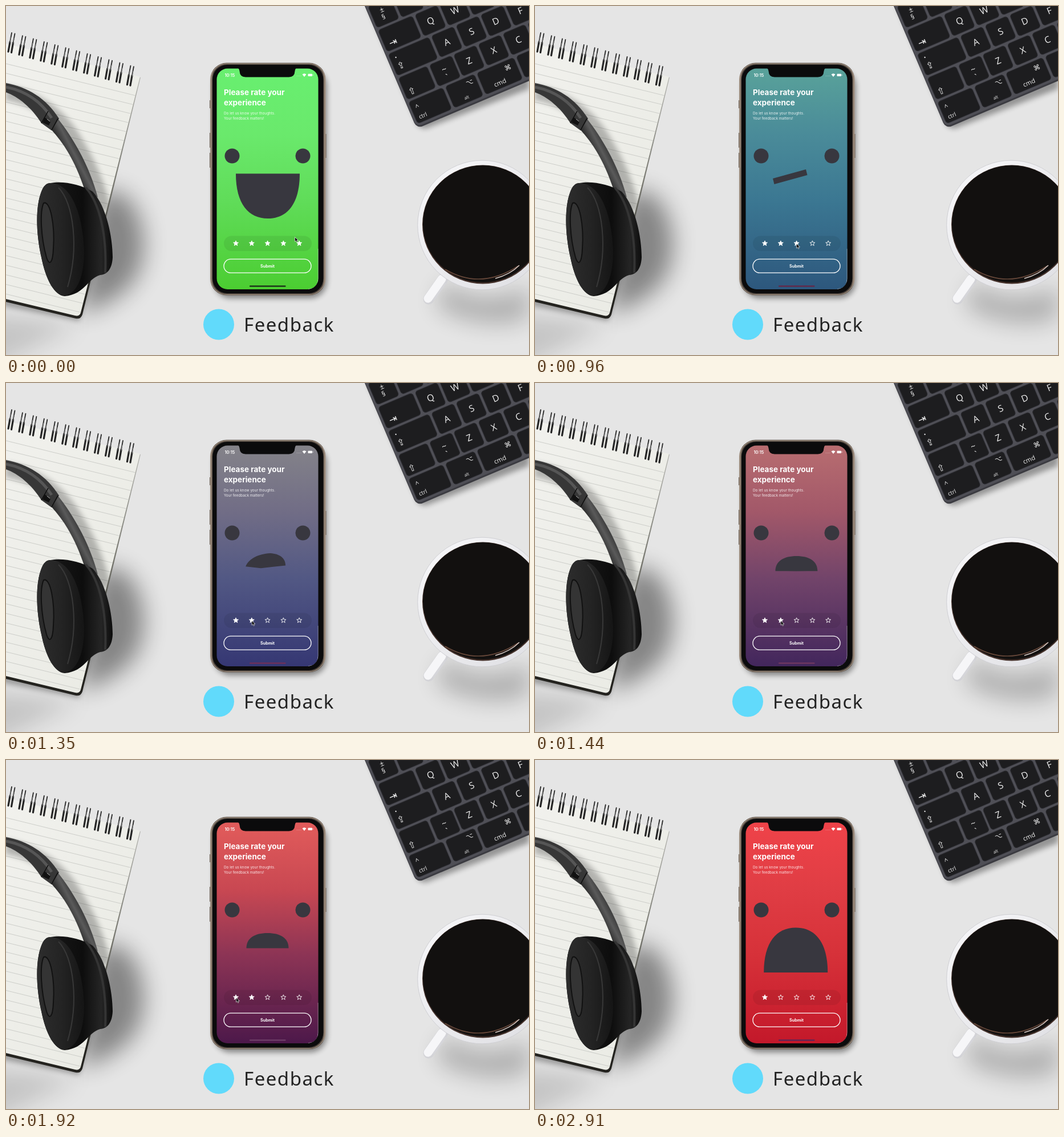
An HTML page that plays this animation: 917 by 611 pixels, repeating every 2.97 s.

```html
<!DOCTYPE html>
<html lang="en">
<head>
<meta charset="utf-8">
<title>Feedback</title>
<style>
  html, body { margin: 0; width: 100%; height: 100%; overflow: hidden; background: #e5e5e5; }
  svg { display: block; width: 917px; height: 611px; }
  #screen text { font-family: Inter, Roboto, sans-serif; fill: #fff; }
  #keys text { font-family: "Open Sans", "DejaVu Sans", sans-serif; fill: #f0f0f0; text-anchor: middle; }
</style>
</head>
<body>
<svg viewBox="0 0 917 611">
  <defs>
    <filter id="soft" x="-60%" y="-60%" width="220%" height="220%"><feGaussianBlur stdDeviation="20"/></filter>
    <filter id="near" x="-50%" y="-50%" width="200%" height="200%"><feGaussianBlur stdDeviation="5"/></filter>
    <linearGradient id="sky" x2="0" y2="1">
      <stop/><stop offset=".3"/><stop offset=".6"/><stop offset="1"/>
    </linearGradient>
    <linearGradient id="paper" x2="1" y2="1">
      <stop stop-color="#f1f1ed"/><stop offset="1" stop-color="#e9eae3"/>
    </linearGradient>
    <linearGradient id="cover" x2="0" y2="1">
      <stop stop-color="#c4c4c0"/><stop offset=".5" stop-color="#77776f"/><stop offset=".9" stop-color="#24231f"/>
    </linearGradient>
    <linearGradient id="arm" gradientUnits="userSpaceOnUse" x1="97" y1="254" x2="126" y2="239">
      <stop stop-color="#222"/><stop offset=".55" stop-color="#5a5a5a"/><stop offset="1" stop-color="#303030"/>
    </linearGradient>
    <linearGradient id="cup" x2="1">
      <stop stop-color="#1c1c1c"/><stop offset=".6" stop-color="#0d0d0d"/>
      <stop offset=".85" stop-color="#252525"/><stop offset="1" stop-color="#0c0c0c"/>
    </linearGradient>
    <linearGradient id="pad" x2="1">
      <stop stop-color="#2d2d2d"/><stop offset=".5" stop-color="#242424"/><stop offset="1" stop-color="#151515"/>
    </linearGradient>
    <linearGradient id="china" x2="1" y2="1">
      <stop stop-color="#f8f8fa"/><stop offset="1" stop-color="#dedee2"/>
    </linearGradient>
    <linearGradient id="metal" x2="1">
      <stop stop-color="#9a8a7a"/><stop offset=".03" stop-color="#4d443d"/>
      <stop offset=".97" stop-color="#4d443d"/><stop offset="1" stop-color="#a59382"/>
    </linearGradient>
    <clipPath id="glass"><rect x="369.5" y="109.5" width="178" height="386.5" rx="19"/></clipPath>
    <clipPath id="page"><path d="M0 66L235 124L131 537Q129 544 121 542L0 513Z"/></clipPath>
  </defs>

  <!-- notebook -->
  <path d="M160 330C215 300 250 380 240 440S180 520 130 540Z" opacity=".42" filter="url(#soft)"/>
  <path d="M-40 540L130 556L-40 640Z" opacity=".14" filter="url(#soft)"/>
  <path d="M-20 522L128 551L165 420L120 520L-20 500Z" opacity=".3" filter="url(#near)"/>
  <path d="M0 70L236 125L134 540Q131 549 122 547L0 518Z" fill="url(#cover)"/>
  <path d="M0 66L235 124L131 537Q129 544 121 542L0 513Z" fill="url(#paper)"/>
  <g id="lines" clip-path="url(#page)" stroke="#c9cac6" stroke-width=".9"></g>
  <g id="coils" stroke="#262626" stroke-linecap="round"></g>

  <!-- headphones -->
  <g clip-path="url(#page)">
    <path d="M0 152C50 160 92 190 118 232S160 310 172 360" fill="none" stroke="#000" stroke-width="26" opacity=".25" filter="url(#near)"/>
  </g>
  <path d="M90 196C122 236 148 286 161 335L138 322C124 280 106 245 79 216Z" fill="url(#arm)"/>
  <path d="M0 135C38 142 70 161 93 197L80 218L62 205C45 178 22 159 0 151Z" fill="#373737"/>
  <path d="M0 142C36 149 62 168 80 196" fill="none" stroke="#565656" stroke-width="5"/>
  <path d="M74 184L62 205M91 197L80 217" stroke="#0c0c0c" stroke-width="1.5"/>
  <path d="M68 195l10 8l-3 6l-11 -5z" fill="#111"/><path d="M72 198l5 4" stroke="#aaa"/>
  <path d="M78 310C100 306 130 312 152 325C176 350 187 405 187 440C186 460 178 470 165 471C142 478 138 505 103 508C85 507 70 480 62 440C52 395 52 350 62 325C66 315 70 311 78 310Z" fill="url(#cup)"/>
  <path d="M140 318C164 345 177 400 174 467" fill="none" stroke="#343434" stroke-width="4"/>
  <path d="M76 310C112 308 134 360 137 425C138 470 126 503 103 507C85 506 70 480 62 440C52 395 52 350 62 325C66 315 70 311 76 310Z" fill="url(#pad)"/>
  <path d="M66 345C78 340 86 385 83 425C82 450 76 456 71 440C61 405 59 360 66 345Z" fill="#343434" stroke="#111" stroke-width="2"/>
  <path d="M92 318C119 345 128 425 108 492" fill="none" stroke="#383838" stroke-width="2"/>

  <!-- keyboard -->
  <path d="M634 0L723 211L735 215L917 145V60Z" opacity=".35" filter="url(#near)"/>
  <g id="keys" transform="translate(773 63) rotate(-23)">
    <rect x="-108" y="-220" width="420" height="339" rx="11" fill="#3b3b41"/>
    <rect x="-107" y="-220" width="416" height="336" rx="10" fill="#4f4f56"/>
  </g>

  <!-- coffee -->
  <path d="M770 480C800 520 880 515 917 490V545C860 570 780 545 755 525Z" opacity=".24" filter="url(#soft)"/>
  <path d="M766 478L741 513" stroke="#d3d3d7" stroke-width="19" stroke-linecap="round"/>
  <path d="M764 478L740 512" stroke="#f6f6f8" stroke-width="15" stroke-linecap="round"/>
  <path d="M770 486L750 514" stroke="#d6d6da" stroke-width="3" stroke-linecap="round"/>
  <circle cx="835" cy="383.5" r="113.3" fill="url(#china)" stroke="#cfcfd3"/>
  <ellipse cx="836" cy="382.5" rx="106" ry="104" fill="#43302a"/>
  <ellipse cx="836" cy="381.5" rx="105" ry="102.5" fill="#12100f"/>
  <path d="M770 461Q832 498 898 455" fill="none" stroke="#67483a" stroke-width="1.5"/>
  <path d="M858 477Q884 470 900 454" fill="none" stroke="#d9cbc6" stroke-width="1.5"/>

  <!-- phone -->
  <rect x="364" y="110" width="199" height="402" rx="30" opacity=".4" filter="url(#near)"/>
  <path d="M358 165v14M358 222v26M358 257v26M560.500 224v42" stroke="#6e6258" stroke-width="2"/>
  <rect x="358" y="99.500" width="202.500" height="407" rx="29" fill="url(#metal)"/>
  <rect x="359.300" y="100.800" width="200" height="404.500" rx="28" fill="none" stroke="#a39282" stroke-width="1.200"/>
  <rect x="362" y="103" width="194.500" height="400" rx="26" fill="#0b0b0c"/>
  <g id="screen" clip-path="url(#glass)">
    <rect x="369" y="109" width="179" height="388" fill="url(#sky)"/>
    <path d="M547.2 425V478Q547 495 530 495.7" fill="none" stroke="#fff" opacity=".55"/>
    <text x="383.5" y="124" font-size="7.3" font-weight="600">10:15</text>
    <path d="M519.5 119.8Q523 116.8 526.5 119.8L523 124Z" fill="#fff"/>
    <rect x="529.5" y="118.7" width="7.5" height="4.2" rx="1" fill="#fff"/>
    <path d="M538.3 120v1.6" stroke="#fff" stroke-width=".8"/>
    <path d="M509.5 122.5h8" stroke="#fff" stroke-dasharray="1 1.3" opacity=".4"/>
    <g font-size="13.5" font-weight="700">
      <text x="382" y="156.3">Please rate your</text><text x="382" y="173.5">experience</text>
    </g>
    <g font-size="6.4" opacity=".85">
      <text x="382" y="190.3">Do let us know your thoughts.</text><text x="382" y="198.5">Your feedback matters!</text>
    </g>
    <g fill="#38373f">
      <circle cx="396.5" cy="262.5" r="13"/><circle cx="520.5" cy="262.5" r="13"/>
      <path id="mouth"/>
    </g>
    <rect x="382" y="402.5" width="154" height="26.5" rx="13.2" opacity=".07"/>
    <g id="stars" stroke="#fff" stroke-width=".9" stroke-linejoin="round"></g>
    <rect x="382" y="443.2" width="153" height="24" rx="12" fill="none" stroke="#fff" stroke-width="1.3"/>
    <text x="458.5" y="457.8" font-size="7.2" font-weight="700" text-anchor="middle">Submit</text>
    <path id="bar" d="M428 490.5H489.5" stroke-width="2.2" stroke-linecap="round"/>
    <path id="cursor" d="M0 0V8L1.9 6.4L3.2 9.2L4.6 8.5L3.4 5.8H6Z" fill="#111" stroke="#fff" stroke-width=".6"/>
  </g>
  <path d="M405 108H511Q507 109 506.5 114Q506 124.5 496 124.5H420Q410 124.5 409.5 114Q409 109 405 108Z" fill="#0b0b0c"/>

  <circle cx="373" cy="557.5" r="27" fill="#61dafb"/>
  <text x="417" y="570" font-family="'Noto Sans', 'Open Sans', sans-serif" font-size="33" letter-spacing="1.5" fill="#222">Feedback</text>
</svg>
<script>
const LOOP = 2970, STEP = 30;
const $ = id => document.getElementById(id);
const add = (parent, tag, attrs, text) => {
  const el = document.createElementNS('http://www.w3.org/2000/svg', tag);
  for (const k in attrs) el.setAttribute(k, attrs[k]);
  if (text) el.textContent = text;
  return $(parent).appendChild(el);
};
const mix = (a, b, k) => a.map((v, i) => v + (b[i] - v) * k);
const clamp = v => Math.max(0, Math.min(1, v));
const easeOut = (k, power) => 1 - (1 - clamp(k)) ** power;

// Notebook
for (let i = 0; i < 26; i++) {
  const y = 101 + i * 16.8;
  add('lines', 'path', { d: `M0 ${y}L240 ${y + 59}` });
}
for (let i = 0; i < 12; i++) {
  const x = 8 + i * 18.95, y = 66 + i * 5.25;
  for (const dx of [0, 5.5]) {
    const left = x + dx, top = y - 19 + dx / 4;
    add('coils', 'path', { d: `M${left + 2} ${top}l-3 16`, 'stroke-width': 1.8 });
    add('coils', 'path', { d: `M${left - 1} ${top + 16}l-3 17`, 'stroke-width': 3.2 });
    add('coils', 'path', { d: `M${left + .8} ${top + 8}l-1.6 9`, stroke: '#999', 'stroke-width': .7 });
  }
}

// Keyboard: each row is y, then pairs of left and right key edges
const rows = [
  [-91, -103, -61, -56, -14, -9, 33, 38, 80],
  [-45.5, -103, -38, -33, 9, 14, 56, 61, 103, 108, 150],
  [0, -103, -26, -21, 21, 26, 68, 73, 115, 120, 162],
  [45.5, -103, -49, -44, -2, 2, 44, 49, 91, 96, 138, 143, 185],
  [91, -103, -38, -33, 22, 27, 97, 102, 300]
];
for (const [y, ...edges] of rows)
  for (let i = 0; i < edges.length; i += 2)
    add('keys', 'rect', { x: edges[i], y: y - 20.5, width: edges[i + 1] - edges[i], height: 41, rx: 5, fill: '#1d1d1f', stroke: '#2b2b30' });
const legends = [
  ['Q', -12, -45.5, 16], ['W', 35, -45.5, 16], ['A', 0, 0, 16], ['S', 47, 0, 16], ['D', 93, 0, 16], ['F', 140, 0, 16],
  ['Z', 23, 45.5, 16], ['X', 70, 45.5, 16], ['C', 117, 45.5, 16], ['~', -23, 42, 15], ['`', -23, 57, 15],
  ['±', -83, -97, 13], ['§', -85, -84, 12], ['⇥', -87, -37, 17], ['•', -93, -10, 10], ['⇪', -90, 6, 16],
  ['⇧', -90, 55, 16], ['^', -92, 84, 12], ['ctrl', -89, 102, 10], ['⌥', 9, 80, 11], ['alt', -6, 103, 7.5],
  ['⌘', 81, 83, 12], ['cmd', 58, 102, 11]
];
for (const [s, x, y, size] of legends) add('keys', 'text', { x, y: y + size * .35, 'font-size': size }, s);

// Mouths: a closed loop of four cubic curves, twelve points each
const line = (a, b) => [a, mix(a, b, 1 / 3), mix(a, b, 2 / 3)];
const quad = (a, b, c, d) => [...line(a, b), ...line(b, c), ...line(c, d), ...line(d, a)].flat();
function bowl(x, y, w, h) {
  const l = [x - w, y], m = [x, y], r = [x + w, y];
  return [...line(l, m), ...line(m, r), r, [x + w, y + h * .68], [x + w * .6, y + h],
    [x, y + h], [x - w * .6, y + h], [x - w, y + h * .68]].flat();
}
function dome(x, y, w, h) {
  const l = [x - w, y], m = [x, y], r = [x + w, y];
  return [l, [x - w, y - h * .68], [x - w * .6, y - h], [x, y - h], [x + w * .6, y - h], [x + w, y - h * .68],
    ...line(r, m), ...line(m, l)].flat();
}
const toPath = p => `M${p[0]} ${p[1]}` + [2, 8, 14, 20].map(i => 'C' + [...p, p[0], p[1]].slice(i, i + 6)).join('') + 'Z';

const rgb = list => list.split(' ').flatMap(c => [0, 2, 4].map(i => parseInt(c.slice(i, i + 2), 16)));
// Colours: four gradient stops, then the home bar
const moods = [
  { stars: 5, mouth: bowl(459, 293.5, 56, 78.5), colors: rgb('68ef70 6ae96c 60dc59 4bcd31 151515') },
  { stars: 4, mouth: bowl(459, 300, 47, 55), colors: rgb('70f474 66dd69 59cb54 42c43a 151515') },
  { stars: 3, mouth: quad([417, 302], [475, 286], [477.5, 296], [419.5, 312]), colors: rgb('5596a0 467fa0 366a9b 2a4687 7a2348') },
  { stars: 2, mouth: dome(458.5, 329.5, 37, 26.5), colors: rgb('e25c5b c94852 8c3455 4c184a 74456c') },
  { stars: 1, mouth: dome(457.2, 372, 56, 78.5), colors: rgb('ef4349 e03d44 d63139 c3182a 4a2a60') }
];
// Start and length of the change into each later mood
const changes = [[210, 330], [750, 330], [1290, 330], [1920, 180]];
// Pointer stops: time, x, y
const stops = [[0, 506.5, 404.5], [30, 506.5, 404.5], [90, 485.5, 415.5], [570, 485.5, 415.5], [630, 458.5, 416],
  [1110, 458.5, 416], [1170, 431, 416], [1590, 431, 416], [1650, 403.5, 416], [2610, 403.5, 416], [2670, 376, 399]];

const starShape = x => 'M' + Array.from({ length: 10 }, (_, i) => {
  const r = i % 2 ? 2 : 4.7, a = i * Math.PI / 5;
  return [x + r * Math.sin(a), 415.6 - r * Math.cos(a)];
}).join('L') + 'Z';
const stars = [403, 430.8, 458.6, 486.4, 514.2].map(x => add('stars', 'path', { d: starShape(x) }));
const skyStops = document.querySelectorAll('#sky stop');

function draw(t) {
  let { mouth, colors, stars: count } = moods[0];
  changes.forEach(([start, length], i) => {
    if (t <= start) return;
    const next = moods[i + 1];
    mouth = mix(mouth, next.mouth, easeOut((t - start) / 180, 3));
    colors = mix(colors, next.colors, easeOut((t - start) / length, 2));
    count = next.stars;
  });
  const color = i => `rgb(${colors.slice(i * 3, i * 3 + 3).map(Math.round)})`;
  skyStops.forEach((s, i) => s.setAttribute('stop-color', color(i)));
  $('bar').setAttribute('stroke', color(4));
  $('mouth').setAttribute('d', toPath(mouth));
  stars.forEach((s, i) => s.setAttribute('fill', i < count ? '#fff' : 'none'));

  const n = stops.findIndex(s => s[0] > t);
  $('cursor').style.display = n < 0 ? 'none' : '';
  if (n > 0) {
    const a = stops[n - 1], b = stops[n];
    const [, x, y] = mix(a, b, (t - a[0]) / (b[0] - a[0]));
    $('cursor').setAttribute('transform', `translate(${x} ${y})`);
  }
}

const begin = performance.now();
function tick(now) {
  const t = Math.max(0, now - begin) % LOOP;
  draw(t - t % STEP);
  requestAnimationFrame(tick);
}
draw(0);
requestAnimationFrame(tick);
</script>
</body>
</html>
```
